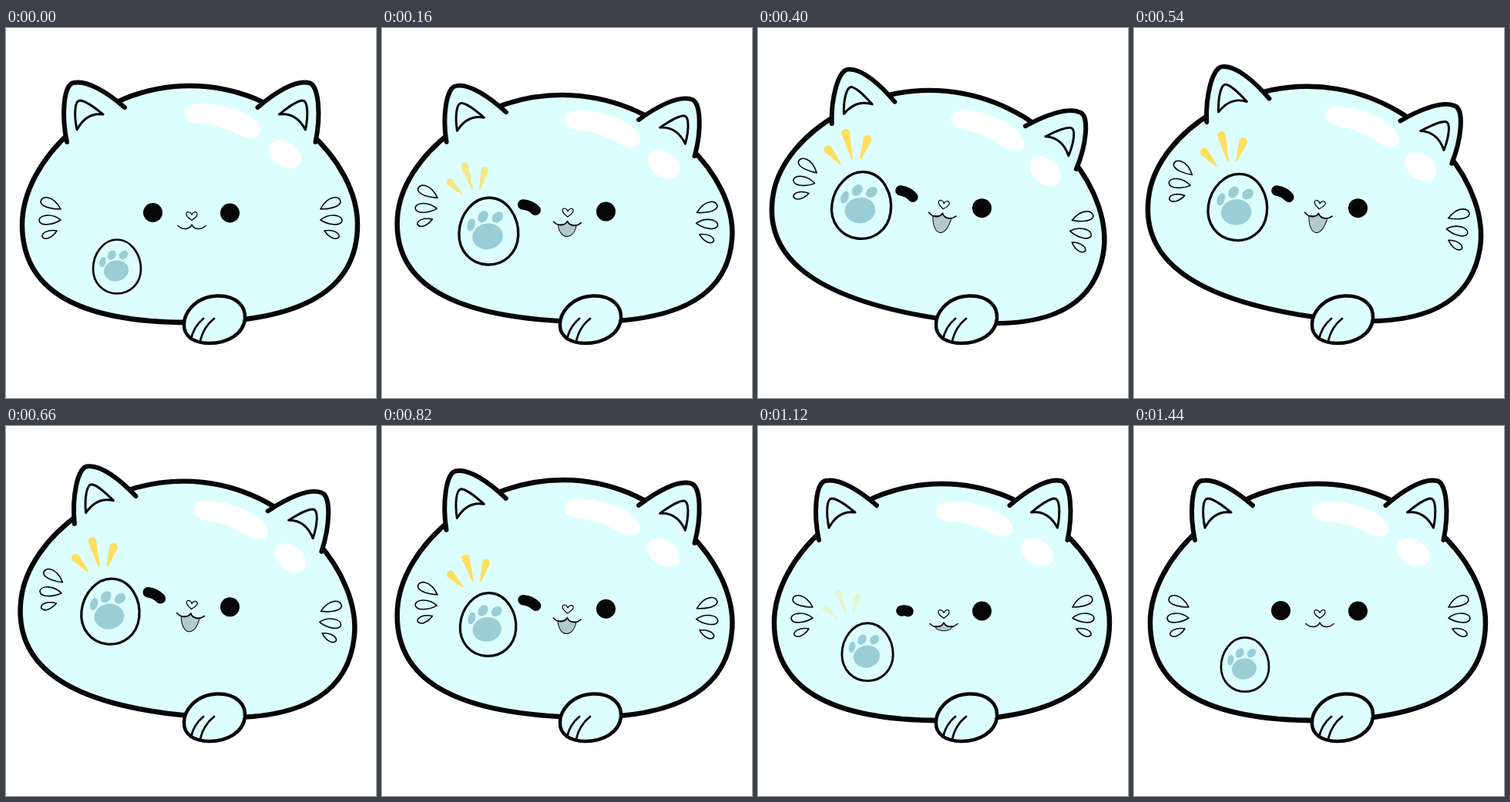
These frames come from a looping animation (480 by 480 pixels, 1.56 s). An HTML page:

```html
<!DOCTYPE html>
<html lang="en">
<head>
<meta charset="utf-8">
<title>Waving cat</title>
<style>
  html, body { margin: 0; width: 100%; height: 100%; overflow: hidden; background: #fff; }
  svg { display: block; width: 100vw; height: 100vh; }
  .skin { fill: #dcfeff; stroke: #060606; }
  .line { fill: none; stroke: #060606; }
  .pad { fill: #9acdd5; }
  path { stroke-linecap: round; stroke-linejoin: round; }
</style>
</head>
<body>
<svg viewBox="0 0 480 480">
  <defs>
    <g id="ear">
      <path fill="#dcfeff" d="M79 148C72 115 74 73 88 71C105 67 132 84 154 103Q140 122 125 135Z"/>
      <path class="line" stroke-width="6" d="M79 148C72 115 74 73 88 71C105 67 132 84 154 103"/>
      <path class="line" stroke-width="3" d="M92 132C88 112 89 94 96 94C105 95 117 105 126 112C112 110 100 117 92 132Z"/>
    </g>
    <g id="whisker" class="skin" stroke-width="1.6">
      <path d="M71 235C62 235 47 233 45 226C45 217 61 216 71 235Z"/>
      <path d="M71 249C62 255 45 258 43 250C43 242 60 240 71 249Z"/>
      <path d="M66 263C54 261 46 266 47 271C51 276 60 272 66 263Z"/>
    </g>
  </defs>

  <g id="body">
    <path class="skin" stroke-width="6.5" d="M238.5 75C358 75 456 172 456 255C456 338 388 382 238.5 382C89 382 21 338 21 255C21 172 119 75 238.5 75Z"/>
    <use href="#ear"/>
    <use href="#ear" transform="translate(480.5 0) scale(-1 1)"/>
  </g>

  <g id="shine" fill="#fff">
    <path d="M232 108C235 96 262 96 285 102C307 108 327 118 330 131C331 144 318 146 305 140C288 131 272 125 250 124C236 123 230 116 232 108Z"/>
    <ellipse cx="362" cy="164" rx="23" ry="16" transform="rotate(33 362 164)"/>
  </g>

  <g id="whiskers">
    <use href="#whisker"/>
    <use href="#whisker" transform="translate(479 0) scale(-1 1)"/>
  </g>

  <g id="face">
    <path id="tongue" fill="#b1cbcc" stroke="#060606" stroke-width="1"/>
    <path class="line" stroke-width="1.6" d="M-18 13Q-13 17.5-8 17Q-2 16.5 0 11.5Q2 16.5 8 17Q13 17.5 18 13"/>
    <path class="skin" stroke-width="1.2" d="M0 6C-4 3-8 0-7-3C-6-6-1-5 0-1C1-5 6-6 7-3C8 0 4 3 0 6Z"/>
  </g>
  <path id="wink" class="line"/>
  <circle id="eye" cx="290.5" r="12.5" fill="#060606"/>

  <g id="sparks" fill="#ffdf5e"></g>

  <g id="paw">
    <path class="skin" stroke-width="2.7" d="M0-35C18-35 31-16 31 3C31 22 17 35 0 35C-17 35-31 22-31 3C-31-16-18-35 0-35Z"/>
    <g class="pad">
      <ellipse cx="-1" cy="5.5" rx="16" ry="13.5" transform="rotate(-12 -1 5.5)"/>
      <ellipse cx="-18.7" cy="-5.8" rx="4" ry="6.8" transform="rotate(12 -18.7 -5.8)"/>
      <ellipse cx="-6.7" cy="-15" rx="5" ry="6.6" transform="rotate(30 -6.7 -15)"/>
      <ellipse cx="8.5" cy="-15" rx="5" ry="6.5" transform="rotate(45 8.5 -15)"/>
    </g>
  </g>

  <path class="skin" stroke-width="4.5" d="M231 384C231 372 243 349 274 347.5C300 347 311 362 310 377C308 398 286 409 264 409C244 409 230 400 231 384Z"/>
  <path class="line" stroke-width="2.8" d="M240 404Q243 388 256 377M252 406Q256 388 270 377"/>
</svg>

<script>
const LOOP = 1560, STEP = 20, SETTLE = 1120;

const clamp = u => Math.min(1, Math.max(0, u));
const ramp = (t, a, b) => clamp((t - a) / (b - a));
const smooth = (t, a, b) => {
  const u = ramp(t, a, b);
  return u * u * (3 - 2 * u);
};
// Rises from 0 to 1 over a..b, falls back over c..d.
const swell = (t, a, b, c, d) => smooth(t, a, b) * (1 - smooth(t, c, d));

const el = id => document.getElementById(id);
const set = (id, attrs) => {
  for (const name in attrs) el(id).setAttribute(name, attrs[name]);
};
const place = (id, x, y, r, sx = 1, sy = sx, px = 0, py = 0) => set(id, {
  transform: `translate(${x} ${y}) rotate(${r}) scale(${sx} ${sy}) translate(${-px} ${-py})`
});

// Drops with a narrow tip, an angle and a length.
const drop = (x, y, angle, len) =>
  `<path transform="translate(${x} ${y}) rotate(${angle})" d="M-1 0L-5 ${-len}A5 5 0 0 1 5 ${-len}L1 0Q0 1-1 0Z"/>`;
el('sparks').innerHTML = drop(-7, 20, -47, 22) + drop(6, 12.5, -20, 31) + drop(16, 11.5, 14, 24);

function draw(t) {
  const tilt = smooth(t, 0, 440) * (1 - ramp(t, 500, SETTLE)) ** 1.75;
  const drift = swell(t, 0, 440, 480, 1100);
  const lift = swell(t, 0, 290, 440, 1400);
  const grow = swell(t, 0, 160, 440, 1500);
  const wink = swell(t, 0, 160, 820, 1400);
  const squash = swell(t, 0, 150, 400, 800);
  const bob = 5.2 * Math.sin(2 * Math.PI * ramp(t, 0, SETTLE) ** 0.7);
  const angle = 10.8 * tilt;

  place('body', 238.5, 228.5 + bob, angle, 1, 1 - 0.045 * squash, 238.5, 228.5);
  place('shine', 321.5 + 14.5 * tilt, 142 + 17 * tilt + 1.2 * bob, 7.6 * tilt, 1, 1, 321.5, 142);
  place('whiskers', 239, 247.5 - 17 * drift, angle, 1, 1, 239, 247.5);

  place('face', 241, 243.5 - 15 * drift, 8 * drift);
  const open = 13 * wink + 8 * drift, low = 16 + 1.33 * open;
  set('tongue', {
    d: `M-12 16.5Q-2 17 0 11.5Q2 17 12 16.5C9 ${low} -9 ${low} -12 16.5Z`,
    visibility: open > 0.5 ? 'visible' : 'hidden'
  });

  set('eye', { cy: 240 - 6.5 * drift });
  place('wink', 190.5 + 3 * drift, 239.5 - 26 * drift, 22 * wink * wink + 6 * drift);
  const half = 9 * wink, arch = half / 4;
  set('wink', {
    d: `M${-half} ${arch / 2}Q0 ${-arch} ${half + 0.01} ${arch / 2}`,
    'stroke-width': 25 - 11.5 * clamp(2 * wink)
  });

  place('sparks', 109 + 8 * drift, 252 - 97 * lift, 6 * drift, 0.85 + 0.25 * lift);
  set('sparks', { opacity: swell(t, 40, 220, 820, 1280) });
  place('paw', 144 - 9.5 * lift, 309.5 - 79.5 * lift, 8 * drift, 1 + 0.24 * grow);
}

const start = performance.now();
function tick() {
  const t = (performance.now() - start) % LOOP;
  draw(t - t % STEP);
  requestAnimationFrame(tick);
}
draw(0);
requestAnimationFrame(tick);
</script>
</body>
</html>
```
